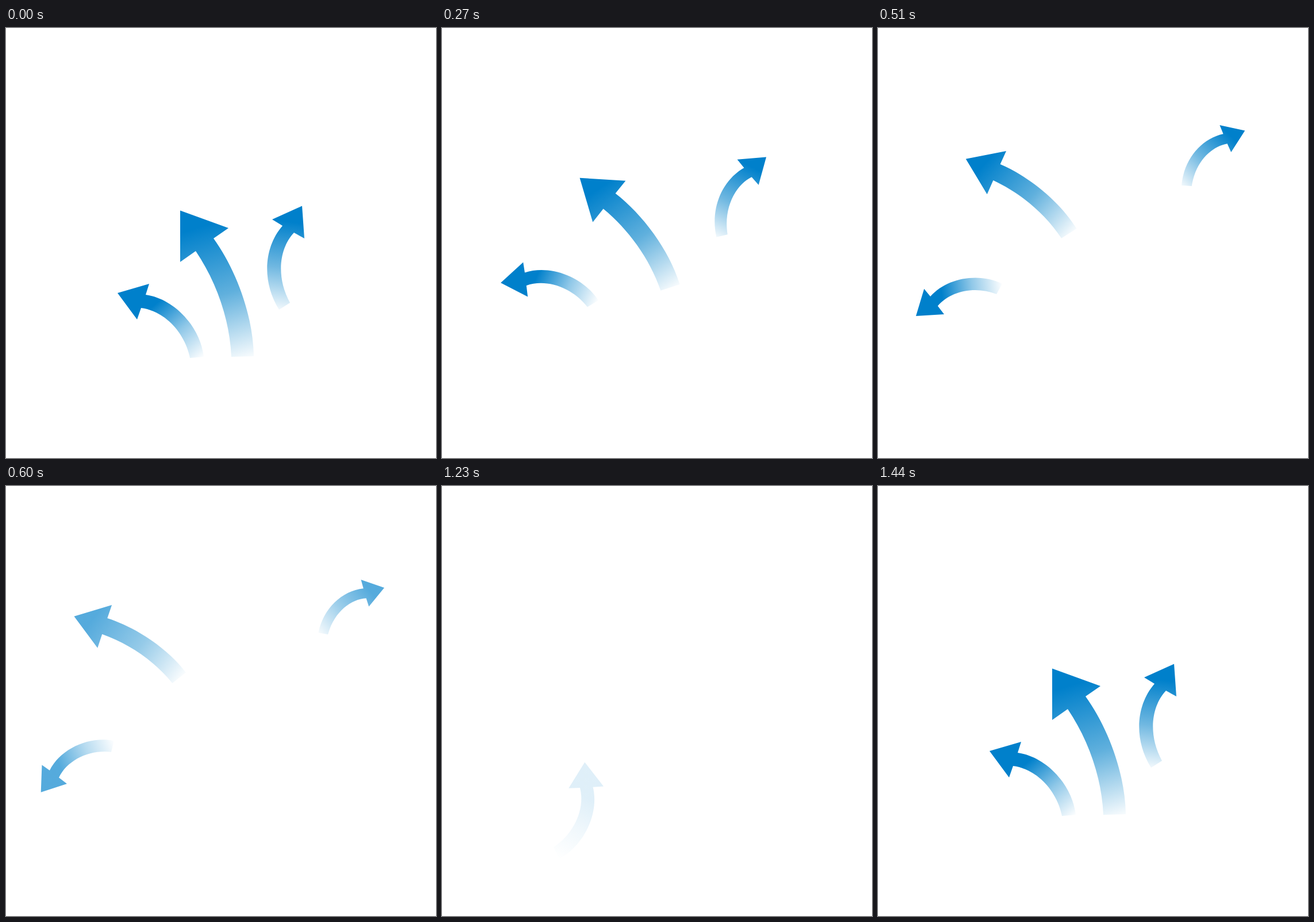
Write an HTML page that moves like this. It is 748x748 px and loops after 2700 ms.

```html
<!DOCTYPE html>
<html lang="en">
<head>
<meta charset="utf-8">
<title>Arrows</title>
<style>
  html, body { margin: 0; width: 100%; height: 100%; overflow: hidden; background: #fff; }
  svg { display: block; width: 100%; height: 100%; }
</style>
</head>
<body>
<svg viewBox="0 0 748 748">
  <defs>
    <linearGradient id="gl" gradientUnits="userSpaceOnUse" x1="259" y1="481" x2="340" y2="577">
      <stop offset="0" stop-color="#0080cb"/><stop offset=".5" stop-color="#90c8e8"/><stop offset="1" stop-color="#fff"/>
    </linearGradient>
    <linearGradient id="gm" gradientUnits="userSpaceOnUse" x1="342" y1="345" x2="414" y2="582">
      <stop offset="0" stop-color="#0080cb"/><stop offset=".5" stop-color="#60b0dd"/><stop offset="1" stop-color="#fff"/>
    </linearGradient>
    <linearGradient id="gr" gradientUnits="userSpaceOnUse" x1="498" y1="338" x2="478" y2="498">
      <stop offset="0" stop-color="#0080cb"/><stop offset=".5" stop-color="#70b8e1"/><stop offset="1" stop-color="#fff"/>
    </linearGradient>
  </defs>
  <path id="left" fill="url(#gl)" d="M194 461L249 445L243 464C293 471 338 520 344 572L320 574C311 529 275 492 235 487L228 507Z"/>
  <path id="middle" fill="url(#gm)" d="M303 317.5L387 348L361 366C400 420 430 500 431 571L392 572C389 505 365 440 330 388L303 407Z"/>
  <path id="right" fill="url(#gr)" d="M515 309.5L519 366L501 356C477 381 468 430 494 478L475 490C445 442 448 382 481 344L463 333Z"/>
</svg>
<script>
const LOOP = 2700, STEP = 30;
const FADE_START = 540, EXIT_END = 720, ENTER_END = 1440;
const PATH_TIMES = [0, 150, 270, 510, 720];

// path: offsets passed on the way out; turn, curl, shrink: change over the exit.
// swing, slide: angle and offset at the start of the entrance.
const arrows = [
  {
    id: 'left', pivot: [269, 509.5],
    path: [[0, 0], [-59.4, -50.2], [-84.8, -56.8], [-133, -39.9], [-159, 22]],
    turn: -66, curl: -28.8, shrink: 0.2,
    enterAt: 1200, swing: 78, slide: [-42, 60]
  },
  {
    id: 'middle', pivot: [367, 445],
    path: [[0, 0], [-14.3, -47.4], [-40.2, -90.9], [-117.6, -156.2], [-195, -178]],
    turn: -43.8, curl: 0, shrink: 0.28,
    enterAt: 1230, swing: 27, slide: [5, 32]
  },
  {
    id: 'right', pivot: [486.5, 400],
    path: [[0, 0], [0.8, -57.6], [27, -108.2], [91.2, -177.7], [126.5, -192]],
    turn: 51.8, curl: 0, shrink: 0.3,
    enterAt: 1230, swing: -78, slide: [48, 8]
  }
];

// Polynomial through all points of the path.
function along(path, t) {
  const at = [0, 0];
  path.forEach((p, i) => {
    const w = PATH_TIMES.reduce((m, s, j) =>
      j === i ? m : m * (t - s) / (PATH_TIMES[i] - s), 1);
    at[0] += p[0] * w;
    at[1] += p[1] * w;
  });
  return at;
}

function leaving(a, t) {
  const u = t / EXIT_END;
  return {
    shift: along(a.path, t),
    angle: a.turn * u + a.curl * u ** 3,
    size: 1 - a.shrink * u,
    alpha: Math.min(1, (EXIT_END - t) / (EXIT_END - FADE_START))
  };
}

function entering(a, t) {
  const p = Math.min(1, Math.max(0, (t - a.enterAt) / (ENTER_END - a.enterAt)));
  const rest = 1 - p;
  return {
    shift: a.slide.map(d => d * rest),
    angle: a.swing * rest,
    size: 1 - 0.08 * rest,
    alpha: p
  };
}

function draw(t) {
  for (const a of arrows) {
    const { shift, angle, size, alpha } = (t < EXIT_END ? leaving : entering)(a, t);
    const [x, y] = a.pivot;
    const el = document.getElementById(a.id);
    el.setAttribute('transform',
      `translate(${x + shift[0]} ${y + shift[1]}) rotate(${angle}) scale(${size}) translate(${-x} ${-y})`);
    el.setAttribute('opacity', alpha);
  }
}

let start;
function tick(now) {
  start ??= now;
  draw(Math.floor(((now - start) % LOOP) / STEP) * STEP);
  requestAnimationFrame(tick);
}
draw(0);
requestAnimationFrame(tick);
</script>
</body>
</html>
```
